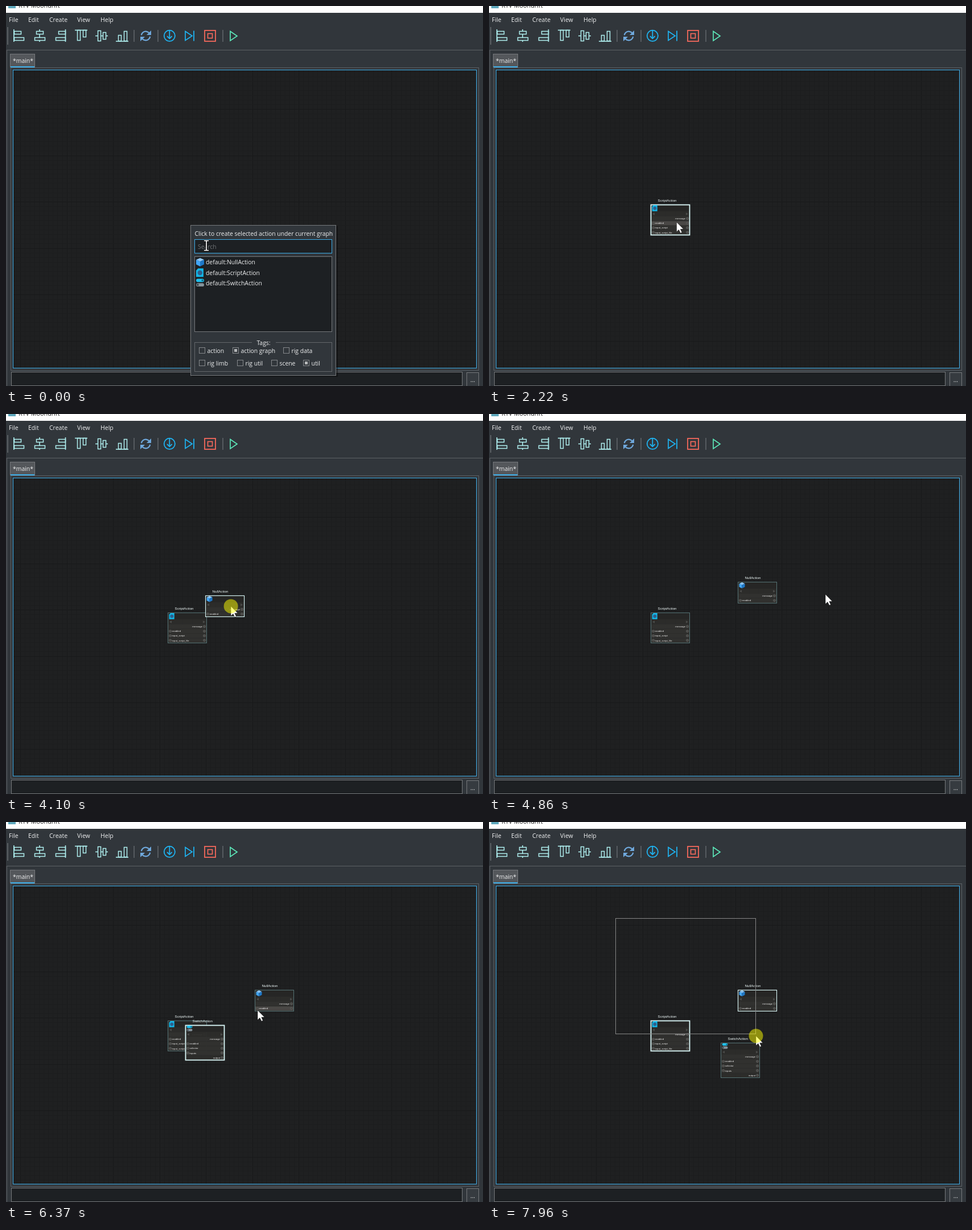
An HTML page with a canvas that plays this animation: 838x668 px, repeating every 8 s.

```html
<!DOCTYPE html>
<html lang="en">
<head>
<meta charset="utf-8">
<title>Node graph editor</title>
<style>
html, body { margin: 0; width: 100%; height: 100%; overflow: hidden; background: #31363b; }
canvas { display: block; width: 838px; height: 668px; }
</style>
</head>
<body>
<canvas id="stage" width="838" height="668"></canvas>
<script>
const ctx = document.getElementById('stage').getContext('2d');
const LOOP = 8000;
const UI = '"Open Sans", "Noto Sans", sans-serif';
const SMALL = '"Liberation Sans", Arial, sans-serif';
const PANEL = '#31363b', FIELD = '#1d2023', EDGE = '#76797c', BLUE = '#3daee9', INK = '#eff0f1', MINT = '#aeeeee';

// Pointer path: time, x, y
const PATH = [
  [0, 352, 421], [560, 386, 466], [1000, 388, 466], [1250, 516, 416], [1460, 548, 377],
  [1730, 548, 377], [1870, 500, 366], [2010, 390, 366], [2150, 329, 380], [2220, 329, 380],
  [2470, 470, 358], [2570, 470, 358], [2850, 512, 428], [3000, 515, 431], [3150, 515, 431],
  [3340, 538, 417], [3960, 393, 340], [4230, 397, 336], [4580, 482, 314], [4630, 482, 314],
  [4770, 591, 317], [4880, 591, 317], [5000, 640, 432], [5210, 665, 470], [5700, 688, 421],
  [6000, 688, 421], [6370, 442, 331], [6510, 446, 315], [6720, 430, 338], [6930, 362, 377],
  [7000, 362, 377], [7400, 454, 408], [7540, 454, 408], [7750, 222, 169], [7960, 469, 376]
];
// Spans in which the mouse button is held
const PRESSES = [[900, 1000], [1730, 2150], [2470, 2560], [2990, 3180], [3960, 4580],
  [4740, 4840], [5830, 5960], [7000, 7440], [7760, 8000]];
const POPUPS = [[0, 970, 324, 385], [2570, 3060, 470, 358], [4930, 5960, 592, 320]];
const MARQUEE = { start: 7760, x: 222, y: 169 };

const NODES = [
  { name: 'ScriptAction', x: 503, y: 346, h: 54, edge: 1.8, born: 970, drag: [1730, 2150], clear: 2500,
    icon: scriptIcon, ports: ['enabled', 'input_script', 'input_script_file'] },
  { name: 'NullAction', x: 348, y: 321, h: 38, edge: 1.1, born: 3060, drag: [3960, 4580], clear: 4760,
    icon: cubeIcon, ports: ['enabled'] },
  { name: 'SwitchAction', x: 315, y: 357, h: 62, edge: 1.8, born: 5960, drag: [7000, 7400], clear: 7760,
    icon: switchIcon, ports: ['enabled', 'selector', 'inputs'], out: 'output' }
];
const NODE_W = 69;

const within = (t, [a, b]) => t >= a && t < b;
const clamp = (v, a, b) => Math.min(b, Math.max(a, v));

function pointer(t) {
  let i = 1;
  while (i < PATH.length - 1 && PATH[i][0] < t) i++;
  const [t0, x0, y0] = PATH[i - 1], [t1, x1, y1] = PATH[i];
  const k = clamp((t - t0) / (t1 - t0), 0, 1);
  return { x: x0 + (x1 - x0) * k, y: y0 + (y1 - y0) * k };
}

function fill(x, y, w, h, color) {
  ctx.fillStyle = color;
  ctx.fillRect(x, y, w, h);
}
function frame(x, y, w, h, color, width = 1) {
  ctx.strokeStyle = color;
  ctx.lineWidth = width;
  ctx.strokeRect(x + 0.5, y + 0.5, w - 1, h - 1);
}
function box(x, y, w, h, bg, edge) {
  fill(x, y, w, h, bg);
  frame(x, y, w, h, edge);
}
function text(s, x, y, size = 10.4, color = INK, align = 'left', font = UI) {
  ctx.font = `${size}px ${font}`;
  ctx.fillStyle = color;
  ctx.textAlign = align;
  ctx.fillText(s, x, y);
}
function poly(points, close = true) {
  ctx.beginPath();
  points.forEach(([x, y], i) => i ? ctx.lineTo(x, y) : ctx.moveTo(x, y));
  if (close) ctx.closePath();
}
function shape(points, color) {
  poly(points);
  ctx.fillStyle = color;
  ctx.fill();
}
function outline(points, color, width, close) {
  poly(points, close);
  ctx.strokeStyle = color;
  ctx.lineWidth = width;
  ctx.stroke();
}
function disc(x, y, r, color) {
  ctx.beginPath();
  ctx.arc(x, y, r, 0, Math.PI * 2);
  ctx.fillStyle = color;
  ctx.fill();
}
function pill(x, y, w, h, color) {
  ctx.beginPath();
  ctx.roundRect(x, y, w, h, h / 2);
  ctx.fillStyle = color;
  ctx.fill();
}

function cubeIcon(x, y, s) {
  const at = (u, v) => [x + u * s, y + v * s];
  shape([at(0.5, 0), at(1, 0.22), at(0.5, 0.45), at(0, 0.22)], '#90caf9');
  shape([at(0, 0.22), at(0.5, 0.45), at(0.5, 1.05), at(0, 0.8)], '#42a5f5');
  shape([at(1, 0.22), at(0.5, 0.45), at(0.5, 1.05), at(1, 0.8)], '#1e78c8');
}
function scriptIcon(x, y, s) {
  shape([[x + s * 0.25, y], [x + s * 0.92, y], [x + s * 0.92, y + s * 1.08], [x, y + s * 1.08], [x, y + s * 0.25]], '#13b5e6');
  disc(x + s * 0.48, y + s * 0.56, s * 0.3, '#2f5f8c');
}
function switchIcon(x, y, s) {
  pill(x, y, s, s * 0.42, '#1fc0ee');
  pill(x, y + s * 0.56, s, s * 0.42, '#85929a');
  disc(x + s * 0.8, y + s * 0.21, s * 0.13, '#126f8c');
  disc(x + s * 0.2, y + s * 0.77, s * 0.13, '#39444a');
}

function alignIcons() {
  const line = (x0, y0, x1, y1) => outline([[x0, y0], [x1, y1]], MINT, 1.6, false);
  const bar = (x, y, w, h) => frame(x, y, w, h, MINT, 1.5);
  line(13.8, 41, 13.8, 63);
  bar(14, 44, 13, 6); bar(14, 55, 18, 6);
  line(59, 41, 59, 44); line(59, 50, 59, 55); line(59, 61, 59, 63);
  bar(53, 44, 13, 6); bar(50, 55, 19, 6);
  line(104.5, 41, 104.5, 63);
  bar(92, 44, 13, 6); bar(87, 55, 18, 6);
  line(121, 42.5, 143, 42.5);
  bar(125, 42, 6, 19); bar(135, 42, 6, 13);
  line(157, 52.5, 161, 52.5); line(167, 52.5, 171, 52.5); line(176, 52.5, 179, 52.5);
  bar(161, 43, 6, 19); bar(170, 46, 6, 13);
  line(193, 62, 215, 62);
  bar(197, 51, 6, 11); bar(207, 44, 6, 18);
}

function runIcons() {
  const sky = '#6fa8dc', cyan = '#1fb4f2';
  ctx.lineWidth = 2.2;
  ctx.strokeStyle = sky;
  for (const a of [Math.PI * 1.05, Math.PI * 0.05]) {
    ctx.beginPath();
    ctx.arc(245.5, 52.5, 7.8, a, a + Math.PI * 0.72);
    ctx.stroke();
  }
  shape([[255, 43], [255, 51], [247, 51]], sky);
  shape([[236, 62], [236, 54], [244, 54]], sky);

  ctx.strokeStyle = cyan;
  ctx.lineWidth = 1.8;
  ctx.beginPath();
  ctx.arc(287.3, 52.3, 9.6, 0, Math.PI * 2);
  ctx.stroke();
  outline([[287.3, 43], [287.3, 57]], cyan, 1.8, false);
  outline([[283, 53], [287.3, 57.3], [291.6, 53]], cyan, 1.8, false);
  outline([[315, 44.5], [327, 52.5], [315, 60.5]], cyan, 1.7);
  outline([[330, 43.5], [330, 61.5]], cyan, 1.8, false);

  frame(348.5, 42.5, 20, 20, '#ff6b5e', 1.7);
  frame(354, 48, 9, 9, '#ff6b5e', 1.6);
  outline([[394, 44.5], [406, 52.7], [394, 61]], '#5ce6b8', 1.7);
}

function grid() {
  fill(12, 112, 815, 525, '#1f2021');
  const step = 8.15;
  const rule = (pos, vertical, color) =>
    vertical ? fill(pos, 113, 1, 523, color) : fill(13, pos, 813, 1, color);
  for (let i = -1; i < 100; i++) {
    const x = Math.round(25.2 + i * step);
    if (x < 826) rule(x, true, i % 10 ? '#1c1d1e' : '#18191a');
  }
  for (let i = -8; i < 56; i++) {
    const y = Math.round(181 + i * step);
    if (y > 113 && y < 636) rule(y, false, i % 10 ? '#1c1d1e' : '#18191a');
  }
  frame(12, 112, 815, 525, BLUE);
}

function chrome() {
  fill(0, 0, 838, 668, PANEL);
  fill(0, 0, 838, 12, '#ffffff');
  fill(4, -9, 13, 13, '#5fa9bd');
  text('KTV Moondrift', 22, 3, 10.8, '#222222');
  [['File', 5], ['Edit', 39], ['Create', 76], ['View', 125], ['Help', 166]]
    .forEach(([s, x]) => text(s, x, 28, 10.5));
  fill(2, 37, 2, 31, '#5b6064');
  [225, 267, 381].forEach(x => fill(x - 1, 42, 2, 21, '#565b60'));
  alignIcons();
  runIcons();

  fill(1, 77, 837, 1, '#5d6165');
  fill(1, 77, 1, 591, '#5d6165');
  frame(8, 108, 823, 533, '#5d6165');
  box(7, 84, 44, 24, '#54575b', EDGE);
  fill(8, 106, 42, 2, BLUE);
  text('*main*', 12, 100);
  grid();
  box(9, 643, 793, 25, FIELD, EDGE);
  box(809, 644, 22, 28, '#363b40', EDGE);
  text('...', 819.8, 661, 10.4, INK, 'center');
}

function placeNode(node, t) {
  const [press, release] = node.drag;
  const a = pointer(press), b = pointer(clamp(t, press, release));
  return { x: node.x + b.x - a.x, y: node.y + b.y - a.y };
}

function marqueeRect(t) {
  if (t < MARQUEE.start) return null;
  const p = pointer(t);
  return { x: MARQUEE.x, y: MARQUEE.y, w: Math.max(0, p.x - MARQUEE.x), h: Math.max(0, p.y - 3 - MARQUEE.y) };
}

function drawNode(node, t, mouse, sweep) {
  if (t < node.born) return;
  const { x, y } = placeNode(node, t);
  const swept = sweep && sweep.x + sweep.w > x && sweep.y + sweep.h > y;
  const selected = t < node.clear || swept;
  const label = (s, lx, ly, align) => text(s, lx, ly + 1.5, 4.35, '#f2f2f2', align, SMALL);
  const port = (px, py) => {
    disc(px, py, 2.4, '#5c5c5a');
    disc(px, py, 1.5, '#484846');
  };

  ctx.globalAlpha = 0.95;
  fill(x, y, NODE_W, node.h, '#2d2d2b');
  fill(x, y, NODE_W, 12, '#262625');
  ctx.globalAlpha = 1;
  const rows = [24.6, ...node.ports.map((_, i) => 32.8 + i * 8.1)];
  rows.forEach((r, i) => {
    const over = i && Math.abs(mouse.y - y - r) < 4 && mouse.x > x && mouse.x < x + NODE_W;
    fill(x + 1, y + r - 3.6, NODE_W - 2, 7.2, over && !within(t, node.drag) ? '#494745' : '#31312f');
  });

  shape([[x + 3, y + 16.5], [x + 7, y + 14.2], [x + 7, y + 18.8]], '#4c4c4a');
  shape([[x + 66, y + 16.5], [x + 62, y + 14.2], [x + 62, y + 18.8]], '#4c4c4a');
  label('message', x + 61, y + 24.6, 'right');
  port(x + 64.5, y + 24.6);
  node.ports.forEach((name, i) => {
    const py = y + rows[i + 1];
    port(x + 4.5, py);
    port(x + 64.5, py);
    label(name, x + 7.6, py, 'left');
  });
  if (node.out) {
    label(node.out, x + 61, y + 57.4, 'right');
    port(x + 64.5, y + 57.4);
  }
  frame(x, y, NODE_W, node.h, selected ? '#dcfafa' : '#557274', selected ? node.edge : 1);
  node.icon(x + 2.5, y + 1, 10);
  text(node.name, x + 12.5, y - 4.6, 6.2, '#f4ffff', 'left', SMALL);
}

function checkbox(x, y, name, on) {
  frame(x, y, 11, 11, '#85888b');
  if (on) fill(x + 3, y + 3, 5, 5, '#b5b7b9');
  text(name, x + 14.5, y + 10);
}

const inSearch = (m, x, y) => m.x > x + 8 && m.x < x + 249 && m.y > y + 25 && m.y < y + 51;

function drawPopup(x, y, mouse) {
  fill(x + 2, y + 2, 257, 265, 'rgba(0,0,0,.35)');
  box(x, y, 256, 265, PANEL, EDGE);
  text('Click to create selected action under current graph', x + 7.5, y + 18.5, 10.35);
  box(x + 7, y + 25, 242, 25, FIELD, inSearch(mouse, x, y) ? BLUE : EDGE);
  text('Search', x + 13, y + 42, 10.4, '#6f7275');
  box(x + 7, y + 55, 242, 133, FIELD, EDGE);
  [['NullAction', cubeIcon], ['ScriptAction', scriptIcon], ['SwitchAction', switchIcon]].forEach(([name, icon], i) => {
    const top = y + 56 + i * 18.2;
    if (mouse.x > x + 8 && mouse.x < x + 248 && mouse.y >= top && mouse.y < top + 18.2)
      fill(x + 8, Math.round(top), 240, 18, '#18465d');
    icon(x + 10, top + 2, 14);
    text('default:' + name, x + 27, top + 13.3);
  });

  frame(x + 7, y + 206, 242, 52, '#63676b');
  fill(x + 108, y + 205, 42, 3, PANEL);
  text('Tags:', x + 128.5, y + 211, 10.4, INK, 'center');
  [['action', 15, 0], ['action graph', 74, 0, 1], ['rig data', 163, 0],
   ['rig limb', 15, 1], ['rig util', 82, 1], ['scene', 142, 1], ['util', 198, 1, 1]]
    .forEach(([name, dx, row, on]) => checkbox(x + dx, y + 215 + row * 22, name, on));
}

function drawArrow(x, y) {
  const pts = [[0, 0], [0, 17], [3.9, 13.4], [6.8, 19.3], [9.4, 18.2], [6.7, 12.4], [12, 12.2]]
    .map(([dx, dy]) => [x + dx, y + dy]);
  shape(pts, '#ffffff');
  outline(pts, 'rgba(0,0,0,.6)', 0.7);
}
function drawBeam(x, y) {
  const strokes = [[[x, y - 8], [x, y + 8]], [[x - 4, y - 8.5], [x + 4, y - 8.5]], [[x - 4, y + 8.5], [x + 4, y + 8.5]]];
  for (const [color, w] of [['#000000', 3.4], ['#ffffff', 1.7]])
    strokes.forEach(s => outline(s, color, w, false));
}

function draw(t) {
  const mouse = pointer(t);
  const sweep = marqueeRect(t);
  const popup = POPUPS.find(p => within(t, p));
  chrome();
  NODES.forEach(n => drawNode(n, t, popup ? { x: -1, y: -1 } : mouse, sweep));
  if (sweep) frame(sweep.x, sweep.y, Math.round(sweep.w), Math.round(sweep.h), '#868686');
  if (popup) drawPopup(popup[2], popup[3], mouse);
  if (popup && inSearch(mouse, popup[2], popup[3])) drawBeam(mouse.x, mouse.y);
  else drawArrow(mouse.x, mouse.y);
  if (PRESSES.some(p => within(t, p))) disc(mouse.x, mouse.y, 12.5, 'rgba(255,255,0,.5)');
}

const start = performance.now();
function tick() {
  draw((performance.now() - start) % LOOP);
  requestAnimationFrame(tick);
}
tick();
</script>
</body>
</html>
```
